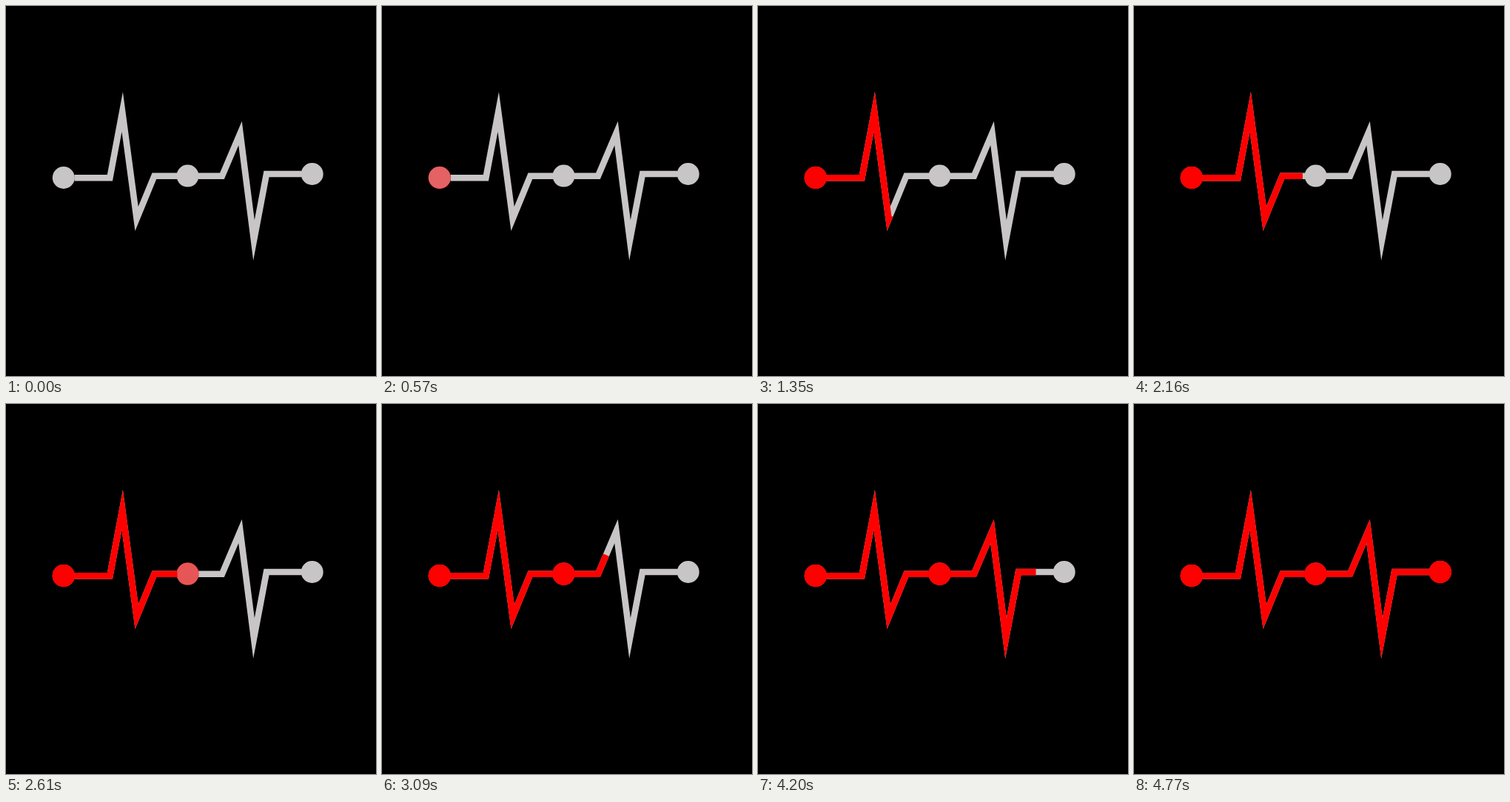
An HTML page for the animation above (5.43 s loop, 500 by 500 pixels).

```html
<!DOCTYPE html>
<html lang="en">
<head>
<meta charset="utf-8">
<title>Pulse line</title>
<style>
  html, body { margin: 0; width: 100%; height: 100%; overflow: hidden; background: #000; }
  svg { display: block; width: 100vw; height: 100vh; }
  path { fill: none; stroke-width: 8.6; stroke-miterlimit: 20; }
  .base path { stroke: #c8c5c6; }
  .base circle { fill: #c8c5c6; }
  .live path { stroke: #f00; }
  .live circle { fill: #f00; }
</style>
</head>
<body>
<svg viewBox="0 0 500 500">
  <g class="base" id="base"></g>
  <g class="live" id="live"></g>
</svg>
<script>
const LOOP = 5430, TICK = 30, FADE = 480;

const clamp = v => Math.min(1, Math.max(0, v));

// Quick start with a long tail, settled when the middle dot lights up
const rush = t => t >= 2340 ? 1 : 1 - (1 - clamp((t - 845) * 0.00037)) ** 7;
const steady = t => clamp((t - 2865) / 1425);

const lines = [
  { d: 'M92.5 232.3H140.4L157.2 143L176.6 287.5L200.4 229.7H231.5', ease: rush },
  { d: 'M260 229.7H292L316.5 172L335 316.6L352 227H399.5', ease: steady }
];
const dots = [
  { cx: 77.8, cy: 232, start: 330 },
  { cx: 245.5, cy: 229.6, start: 2340 },
  { cx: 413.7, cy: 227, start: 4290 }
];

function add(parent, tag, attrs) {
  const el = document.createElementNS('http://www.w3.org/2000/svg', tag);
  for (const key in attrs) el.setAttribute(key, attrs[key]);
  return document.getElementById(parent).appendChild(el);
}

for (const line of lines) {
  add('base', 'path', { d: line.d });
  line.el = add('live', 'path', { d: line.d });
  line.length = line.el.getTotalLength();
}
for (const dot of dots) {
  const { cx, cy } = dot;
  add('base', 'circle', { cx, cy, r: 15 });
  dot.el = add('live', 'circle', { cx, cy, r: 15.3 });
}

function draw(t) {
  for (const { el, ease, length } of lines) {
    const part = ease(t);
    el.style.visibility = part > 0 ? 'visible' : 'hidden';
    el.style.strokeDasharray = part < 1 ? `${part * length} ${length * 2}` : 'none';
  }
  for (const { el, start } of dots) {
    el.style.opacity = clamp((t - start) / FADE);
  }
}

const begin = performance.now();
function frame() {
  const t = (performance.now() - begin) % LOOP;
  draw(Math.floor(t / TICK) * TICK);
  requestAnimationFrame(frame);
}
draw(0);
requestAnimationFrame(frame);
</script>
</body>
</html>
```
